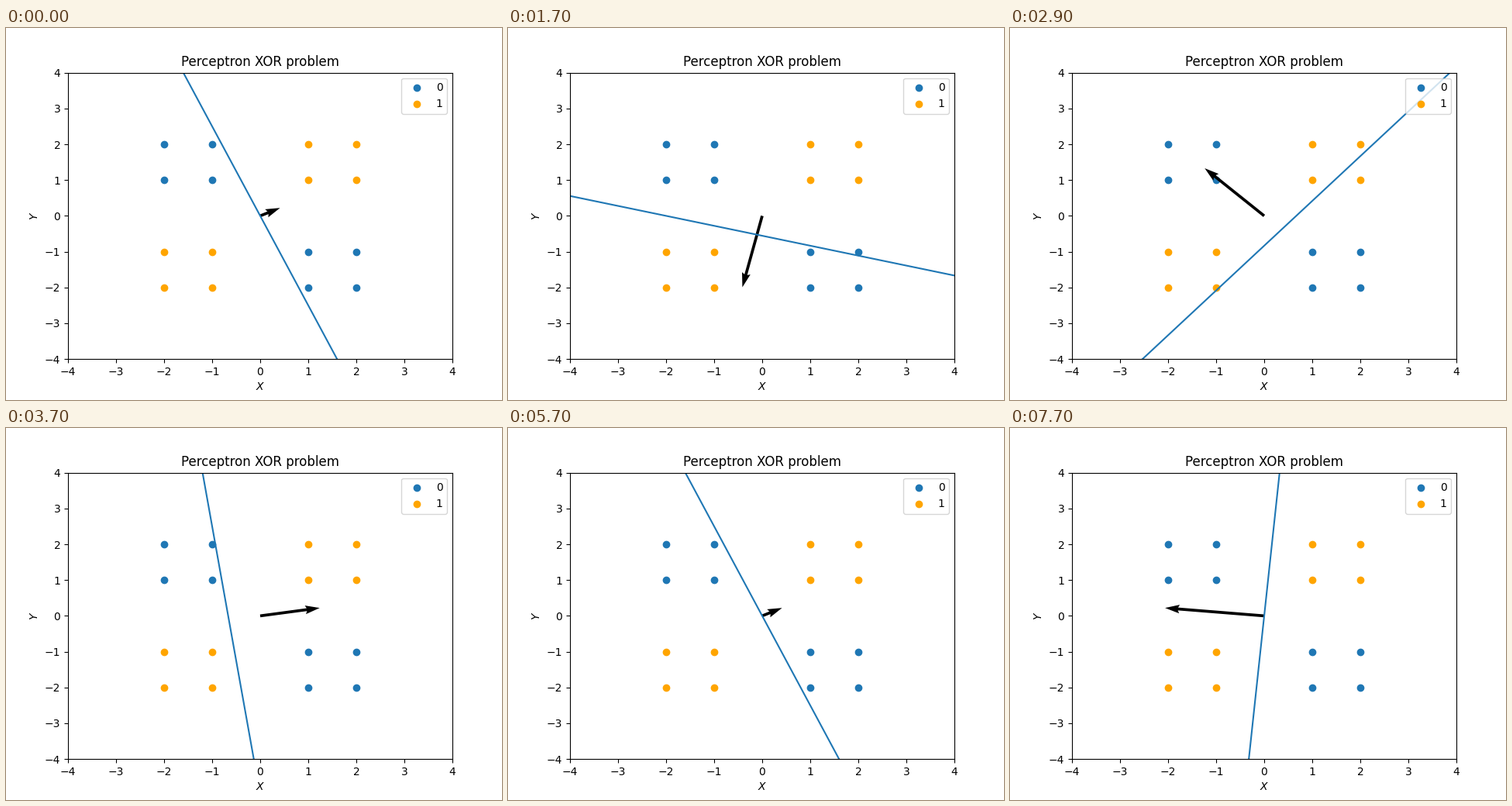
A matplotlib script for the animation above (8 s loop, 640 by 480 pixels).

```python
import numpy as np
import matplotlib.pyplot as plt
from matplotlib.animation import FuncAnimation

FRAMES = 80
INTERVAL = 100
LIMIT = 4
START = np.array([1.0, 0.4, 0.0])  # wx, wy, bias
RATE = 2


def block(xs, ys):
    return [(x, y) for x in xs for y in ys]


# One quadrant after another, with the class of its points.
QUADRANTS = [
    (block((-2, -1), (2, 1)), 0),
    (block((1, 2), (1, 2)), 1),
    (block((1, 2), (-1, -2)), 0),
    (block((-2, -1), (-1, -2)), 1),
]
SAMPLES = [(point, label) for points, label in QUADRANTS for point in points]


def train(steps):
    """Perceptron weights before each step, one sample per step."""
    weights = START.copy()
    history = [weights.copy()]
    for step in range(steps - 1):
        point, label = SAMPLES[step % len(SAMPLES)]
        features = np.array([*point, 1])
        predicted = int(weights @ features > 0)
        weights += RATE * (label - predicted) * features
        history.append(weights.copy())
    return history


history = train(FRAMES)

fig, ax = plt.subplots(figsize=(6.4, 4.8), dpi=100)
for label, color in enumerate(("tab:blue", "orange")):
    xs, ys = zip(*(point for point, kind in SAMPLES if kind == label))
    ax.scatter(xs, ys, color=color, label=str(label))

ax.set(xlim=(-LIMIT, LIMIT), ylim=(-LIMIT, LIMIT),
       title="Perceptron XOR problem", xlabel="$X$", ylabel="$Y$")
ax.legend(loc="upper right")

line_x = np.array([-LIMIT, LIMIT])
boundary, = ax.plot([], [], color="tab:blue")
arrow = ax.quiver([0], [0], [START[0]], [START[1]],
                  scale=18 * np.hypot(*START[:2]), scale_units="width",
                  width=0.0075)


def update(frame):
    wx, wy, bias = history[frame]
    boundary.set_data(line_x, -(wx * line_x + bias) / wy)
    arrow.set_UVC([wx], [wy])
    return boundary, arrow


animation = FuncAnimation(fig, update, frames=FRAMES, interval=INTERVAL,
                          repeat=True, repeat_delay=0)
plt.show()
```
